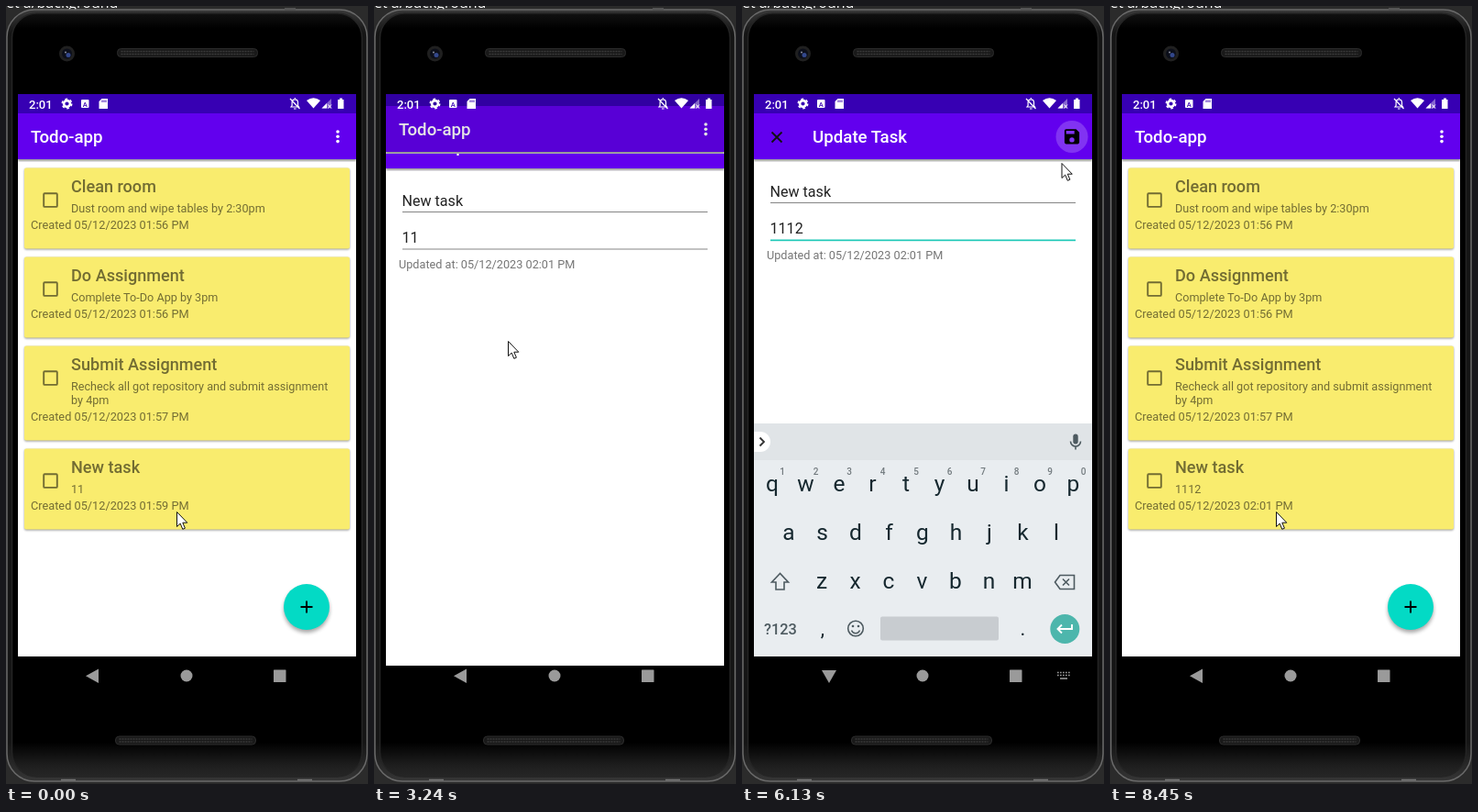
An HTML page for the animation above (9.66 s loop, 395x848 px).

```html
<!DOCTYPE html>
<html lang="en">
<head>
<meta charset="utf-8">
<title>Todo app</title>
<style>
  html, body { margin: 0; width: 100%; height: 100%; overflow: hidden; background: #000; }
  svg { display: block; width: 100%; height: 100%; font-family: Roboto, sans-serif; }
  .bold { font-weight: 500; }
  .mid { text-anchor: middle; }
</style>
</head>
<body>
<svg id="stage" viewBox="0 0 395 848"></svg>
<script>
const LOOP = 9660, OPEN = 3080, CLOSE = 6131, SLIDE = 425;
const TOP = 96, BOTTOM = 709, HEIGHT = BOTTOM - TOP;

// Bursts of activity: first change, last change, number of changes.
const BURSTS = [
  [310, 1330, 9], [1450, 1720, 3], [1870, 1990, 2], [2270, 2820, 5], [3120, 3240, 2],
  [3360, 3510, 2], [3910, 4180, 3], [4330, 4900, 5], [5050, 5860, 7], [6130, 6370, 3],
  [6520, 7060, 5], [7210, 8150, 8], [8300, 8450, 2]
];

// Mouse pointer: time, x, y.
const POINTER = [
  [0, 186, 551], [200, 186, 551], [850, 144, 551], [1330, 146, 551], [1720, 191, 549],
  [1990, 141, 539], [2300, 141, 535], [3240, 146, 365], [3510, 117, 240], [4330, 117, 240],
  [4900, 130, 278], [5050, 145, 270], [5860, 359, 146], [6130, 348.5, 171], [6370, 213, 574],
  [7060, 205, 558], [7600, 176, 549], [8150, 184, 551], [8450, 181, 551], [LOOP, 181, 551]
];

const clamp = v => Math.max(0, Math.min(1, v));
const rect = (x, y, w, h, fill, extra = '') =>
  `<rect x="${x}" y="${y}" width="${w}" height="${h}" fill="${fill}" ${extra}/>`;
const circle = (x, y, r, fill, extra = '') =>
  `<circle cx="${x}" cy="${y}" r="${r}" fill="${fill}" ${extra}/>`;
const text = (x, y, size, str, fill, extra = '') =>
  `<text x="${x}" y="${y}" font-size="${size}" fill="${fill}" ${extra}>${str}</text>`;
const path = (d, fill, extra = '') => `<path d="${d}" fill="${fill}" ${extra}/>`;
const stroke = (d, color, width, extra = '') =>
  path(d, 'none', `stroke="${color}" stroke-width="${width}" ${extra}`);

function phone() {
  const speaker = (x, y) => rect(x, y, 153, 9, '#191919', 'rx="4" stroke="#2c2c2c"') +
    [3, 6].map(dy => stroke(`M${x + 4} ${y + dy}h145`, '#3a3a3a', 1.5, 'stroke-dasharray="2 1"')).join('');
  return rect(0, 0, 395, 848, '#2b2b2b') +
    text(0, 2, 16, 'et a/background', '#fff', 'font-family="Open Sans, sans-serif"') +
    rect(1, 4, 393, 841, 'url(#body)', 'rx="30" stroke="#6a6a6a" stroke-width="1.5"') +
    rect(6.5, 8, 382, 832, 'url(#glass)', 'rx="27" stroke="#242424" stroke-width="1.5"') +
    rect(304, 2, 12, 3, '#555') + stroke('M60 843.5h16M318 843.5h16', '#777', 1.5) +
    circle(66.5, 52, 8.5, '#202020') + circle(66.5, 52, 5.5, '#0c0f1a') + circle(68, 53.5, 2.5, '#33488c') +
    circle(65, 50.5, 1, '#8a8fa0') +
    speaker(121.5, 46.5) + speaker(119.5, 796);
}

function statusIcons() {
  return text(25, 111.5, 13, '2:01', '#fff', 'class="bold"') +
    circle(66.5, 106.5, 3.4, 'none', 'stroke="#fff" stroke-width="2.6"') +
    circle(66.5, 106.5, 5.2, 'none', 'stroke="#fff" stroke-width="1.6" stroke-dasharray="2.7 2.75"') +
    rect(82, 102, 8.5, 9, '#fff', 'rx="1"') + text(86.3, 109.5, 7.5, 'A', '#3700b3', 'class="mid bold"') +
    path('M104.5 101h6.5v11h-9.500v-8z', '#fff') + stroke('M105 102.500v2.500m2-2.500v2.500m2-2.500v2.500', '#3700b3', .9) +
    stroke('M311 110h8.500l-1-1.500v-3.500a3.200 3.200 0 0 0-6.400 0v3.500zM315.300 101v-1M314 112h2.600M310 101l10.500 11', '#fff', 1.2) +
    path('M328 103Q335.500 97.500 343 103L335.500 111.500Z', '#fff') +
    path('M344.500 111.500L355 101V111.500Z', '#fff', 'opacity=".4"') + path('M344.500 111.500L350 106V111.500Z', '#fff') +
    stroke('M351.500 107.500l3.500 4m0-4l-3.500 4', '#fff', 1) +
    path('M362 102h2v-1.500h3v1.500h1.500v10h-6.500z', '#fff');
}

const appBar = (x, title) =>
  rect(13, 160, 369, 9, '#000', 'opacity=".4" filter="url(#soft)"') +
  rect(13, TOP, 369, 21, '#3700b3') + rect(13, 117, 369, 50, '#6200ee') +
  text(x, 149, 18.7, title, '#fff', 'class="bold"');

function card(y, height, title, lines, created, ids = ['', '']) {
  const ink = 'rgba(0,0,0,.54)', middle = y + 35;
  return rect(20, y + 1, 355, height, '#000', 'rx="2" opacity=".4" filter="url(#soft)"') +
    rect(20, y, 355, height, '#f9ec6e', 'rx="2"') +
    rect(41.2, middle - 7.2, 14.6, 14.6, 'none', `rx="1" stroke="${ink}" stroke-width="1.9"`) +
    text(71, y + 26.5, 18.1, title, ink, 'class="bold"') +
    lines.map((line, i) => text(71, y + 48 + i * 15, 12.65, line, ink, ids[0])).join('') +
    text(27, y + height - 21.5, 12.75, `Created 05/12/2023 ${created} PM`, ink, ids[1]);
}

function listWindow() {
  return rect(13, TOP, 369, HEIGHT, '#fff') + appBar(27, 'Todo-app') +
    [137, 142.3, 147.6].map(y => circle(362, y, 1.8, '#fff')).join('') +
    card(176.5, 88, 'Clean room', ['Dust room and wipe tables by 2:30pm'], '01:56') +
    card(273.5, 88, 'Do Assignment', ['Complete To-Do App by 3pm'], '01:56') +
    card(370.5, 103, 'Submit Assignment', ['Recheck all got repository and submit assignment', 'by 4pm'], '01:57') +
    card(482.5, 88, 'New task', ['11'], '01:59', ['id="note"', 'id="created"']) +
    circle(328, 658, 25, '#000', 'opacity=".35" filter="url(#softer)"') +
    circle(328, 655, 25, '#03dac5') + stroke('M321.500 655h13M328 648.500v13', '#000', 2) +
    rect(13, TOP, 369, HEIGHT, '#000', 'id="dim"');
}

function editWindow() {
  const save = 'M17 3H5a2 2 0 0 0-2 2v14a2 2 0 0 0 2 2h14a2 2 0 0 0 2-2V7zM12 19a3 3 0 1 1 0-6a3 3 0 0 1 0 6zM15 9H5V5h10z';
  return rect(13, TOP, 369, HEIGHT, '#fff') + appBar(77, 'Update Task') +
    stroke('M32.500 137.500l11 11m0-11l-11 11', '#111', 1.8) +
    circle(360, 142.5, 17.5, '#fff', 'id="ripple" opacity=".2"') +
    path(save, '#000', 'fill-rule="evenodd" transform="translate(349.200 131.500) scale(.9)"') +
    text(30.5, 208, 16.1, 'New task', '#212121') + rect(31, 214, 333, 1, '#858585') +
    text(30.5, 248.3, 16.1, '11', '#212121', 'id="field"') + rect(31, 254.5, 333, 1, '#858585', 'id="underline"') +
    text(27, 276, 12.7, 'Updated at: 05/12/2023 02:01 PM', '#757575') +
    rect(0, 232, 1.8, 22, '#03dac5', 'id="caret"') +
    path('M48 253l6.300 5.600a9 9 0 1 1-12.600 0z', '#03dac5', 'id="handle"');
}

function keyboard() {
  const ink = '#16282f', grey = '#4d5a60';
  const row = (keys, x, y) => [...keys].map((key, i) =>
    text(x + i * 36.5, y, 24.5, key, ink, 'class="mid"')).join('');
  const digits = [...'1234567890'].map((d, i) =>
    text(44 + i * 36.5, 511, 10, d, '#737b7f', 'class="mid bold"')).join('');
  return rect(13, 455, 369, 254, '#e9edf0') + rect(13, 455, 369, 40, '#e0e4e7') +
    path('M13 464h7a11 11 0 0 1 0 22h-7z', '#fff') + stroke('M19.500 470.500l4.500 4.500l-4.500 4.500', '#333', 1.8) +
    rect(361.3, 466.5, 5.4, 11, grey, 'rx="2.700"') +
    stroke('M358.500 474.500a5.500 5.500 0 0 0 11 0M364 480v3.500', grey, 1.6) +
    row('qwertyuiop', 33, 529) + digits + row('asdfghjkl', 51, 582) + row('zxcvbnm', 87, 635) +
    stroke('M41.500 618.500l-9 9.500h4.500v8h9v-8h4.500z', grey, 1.6) +
    stroke('M347 620.500h15.500v15h-15.500l-5.500-7.500zM350 624.500l7 7m0-7l-7 7', grey, 1.6) +
    text(24, 684.5, 16.4, '?123', grey, 'class="bold"') +
    text(88, 686, 22, ',', ink, 'class="mid"') + text(306.5, 686, 22, '.', ink, 'class="mid"') +
    circle(124, 678.5, 8.3, 'none', `stroke="${grey}" stroke-width="1.6"`) +
    circle(121, 676, 1.3, grey) + circle(127, 676, 1.3, grey) +
    stroke('M119.500 680.500a4.800 4.800 0 0 0 9 0', grey, 1.5) +
    rect(151, 665.5, 129, 26, '#c8ccd0', 'rx="2"') +
    circle(352.3, 679, 16, '#4db6ac') + stroke('M360 674v5h-15M349 674.500l-4.500 4.500l4.500 4.500', '#fff', 1.9);
}

function navigation() {
  const grey = '#9a9a9a';
  return path('M101 722.500v15.500l-14-7.750z', grey, 'id="back"') +
    `<g id="imeNav">${path('M87 724h16l-8 14z', grey)}${
      [726.5, 729.5].map(y => stroke(`M344 ${y}h14`, grey, 1.6, 'stroke-dasharray="1.700 1.300"')).join('')
    }${stroke('M347 733h8', grey, 1.6)}</g>` +
    circle(197, 730, 6.5, grey) + rect(292, 723.5, 13.5, 13.5, grey, 'rx=".5"');
}

const stage = document.getElementById('stage');
stage.innerHTML = `<defs>
  <linearGradient id="body" x2="0" y2="1">
    <stop stop-color="#3a3a3a"/><stop offset=".03" stop-color="#151515"/>
    <stop offset=".95" stop-color="#151515"/><stop offset="1" stop-color="#363636"/>
  </linearGradient>
  <linearGradient id="glass" x2="0" y2="1">
    <stop stop-color="#111"/><stop offset=".02" stop-color="#000"/>
    <stop offset=".955" stop-color="#000"/><stop offset=".985" stop-color="#1e1e1e"/><stop offset="1" stop-color="#262626"/>
  </linearGradient>
  <filter id="soft"><feGaussianBlur stdDeviation="1.2"/></filter>
  <filter id="softer"><feGaussianBlur stdDeviation="2"/></filter>
  <clipPath id="screen"><rect x="13" y="96" width="369" height="656"/></clipPath>
  <clipPath id="pane"><rect x="13" y="96" width="369" height="613"/></clipPath>
  <clipPath id="revealed"><rect id="reveal" x="13" width="369"/></clipPath>
</defs>
${phone()}
<g clip-path="url(#screen)">
  ${rect(13, TOP, 369, 656, '#000')}
  <g id="list" clip-path="url(#pane)">${listWindow()}</g>
  <g id="edit" clip-path="url(#revealed)">${editWindow()}</g>
  <g clip-path="url(#pane)"><g id="keyboard">${keyboard()}</g></g>
  ${navigation()}${statusIcons()}
  ${text(197, 670, 12.65, 'Task updated', '#444', 'id="toast" class="mid"')}
</g>
${path('M.500.500v16l3.700-3.400l2.600 6.200l2.600-1.100l-2.600-6h5z', '#fff', 'id="pointer" stroke="#111"')}`;

const el = Object.fromEntries([...stage.querySelectorAll('[id]')].map(node => [node.id, node]));
const show = (node, visible) => node.setAttribute('visibility', visible ? 'inherit' : 'hidden');
const move = (node, x, y) => node.setAttribute('transform', `translate(${x} ${y})`);

// Holds the picture between the changes of a burst.
function snap(t) {
  let held = 0;
  for (const [from, to, count] of BURSTS) {
    const step = (to - from) / (count - 1);
    if (t >= from) held = from + step * Math.min(count - 1, Math.floor((t - from) / step + 1e-6));
  }
  return held;
}

function pointerAt(t) {
  const i = POINTER.findIndex(key => key[0] > t);
  const [t0, x0, y0] = POINTER[i - 1], [t1, x1, y1] = POINTER[i];
  const k = (t - t0) / (t1 - t0);
  return [x0 + (x1 - x0) * k, y0 + (y1 - y0) * k];
}

function render(t) {
  const opening = clamp((t - OPEN) / SLIDE), closing = clamp((t - CLOSE) / SLIDE);
  const closed = t >= CLOSE;
  const away = closed ? (1 - closing) ** 2.3 : 1 - (1 - opening) ** 2;
  const revealed = HEIGHT * (closed ? (1 - closing) ** 8 : 1 - (1 - opening) ** 5.1);

  move(el.list, 0, -Math.round(13 * away));
  el.dim.setAttribute('opacity', .1 * (closed ? (1 - closing) ** .6 : clamp(opening * 3)));
  el.note.textContent = closed ? '1112' : '11';
  el.created.textContent = `Created 05/12/2023 ${closed ? '02:01' : '01:59'} PM`;

  show(el.edit, revealed > 0);
  move(el.edit, 0, Math.round(26 * (1 - away)));
  el.reveal.setAttribute('y', BOTTOM - revealed);
  el.reveal.setAttribute('height', revealed);
  show(el.ripple, t >= 6000);

  const typed = t < 4600 ? '11' : t < 4740 ? '111' : '1112';
  const focused = t >= 3910;
  el.field.textContent = typed;
  el.underline.setAttribute('fill', focused ? '#1fc9b8' : '#858585');
  el.underline.setAttribute('height', focused ? 1.7 : 1);
  el.caret.setAttribute('x', 29.8 + typed.length * 9.04);
  show(el.caret, focused && (t < 5250 || t > 5700 && t < 6100));
  show(el.handle, focused && t < 4450);

  const raised = t < CLOSE ? clamp((t - 3910) / 270) : 1 - clamp((t - CLOSE) / 220);
  move(el.keyboard, 0, 254 * (1 - raised));
  show(el.keyboard, raised > 0);
  show(el.imeNav, raised > 0);
  show(el.back, raised === 0);

  el.toast.setAttribute('opacity', Math.min(clamp((t - 6200) / 280), clamp((8450 - t) / 300)));
  move(el.pointer, ...pointerAt(t));
}

function tick() {
  render(snap(performance.now() % LOOP));
  requestAnimationFrame(tick);
}
tick();
</script>
</body>
</html>
```
